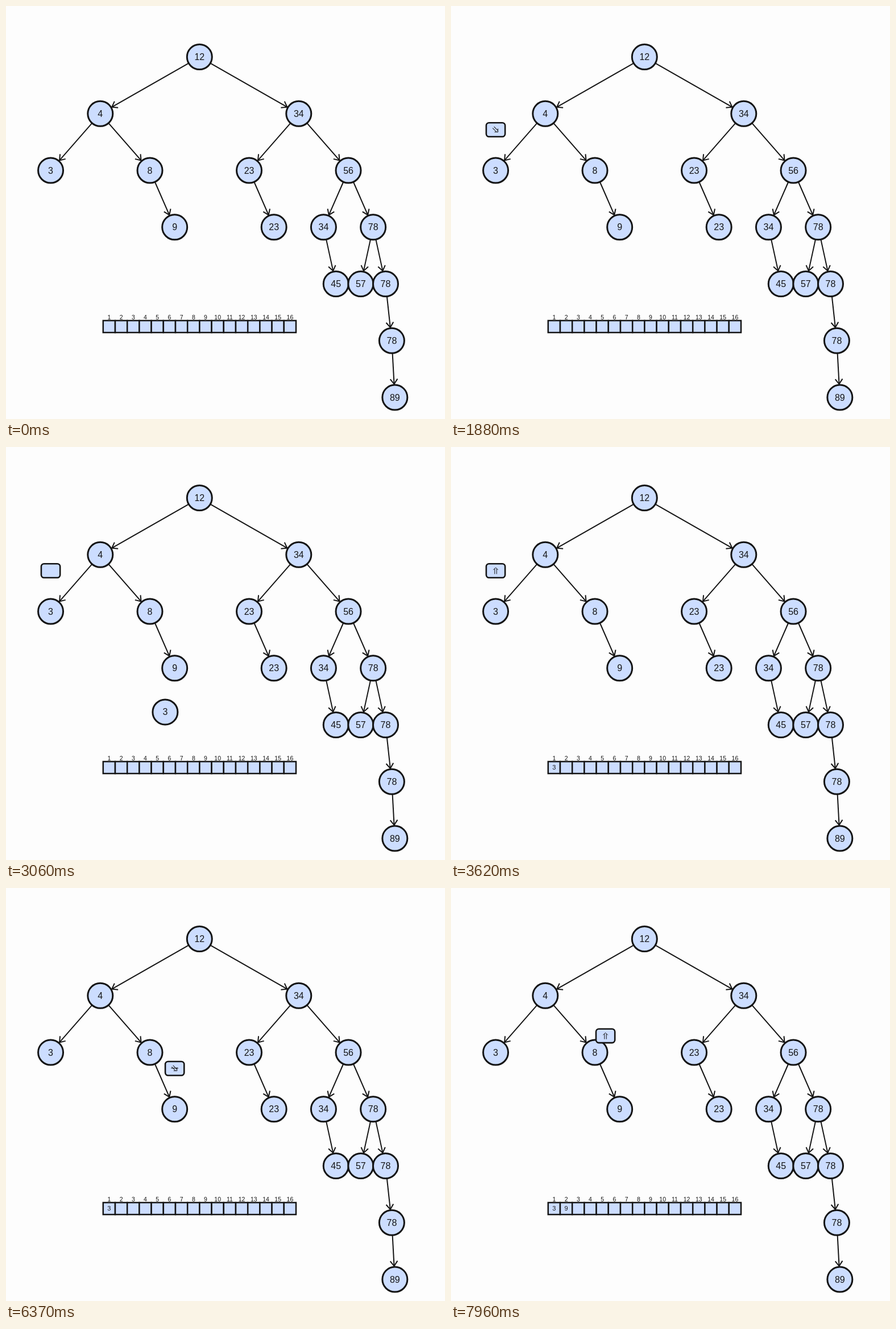
Write an HTML page with a canvas that moves like this. It is 772x726 px and loops after 7990 ms.

```html
<!DOCTYPE html>
<html lang="en">
<head>
<meta charset="utf-8">
<title>Tree traversal</title>
<style>
html, body { margin: 0; width: 772px; height: 726px; overflow: hidden; background: #fdfdfd; }
canvas { display: block; }
</style>
</head>
<body>
<canvas id="stage" width="772" height="726"></canvas>
<script>
const ctx = document.getElementById('stage').getContext('2d');
const LOOP = 7990, INK = '#141414', FILL = '#ccddff', FONT = '"Liberation Sans", Arial, sans-serif';
const ROOT = [340.3, 89.6], GAP = 99.75, SPREAD = 174.5, RADIUS = 22;

// Each node: the path from the root, then its value.
const nodes = Object.fromEntries(
  ':12 L:4 R:34 LL:3 LR:8 RL:23 RR:56 LRR:9 RLR:23 RRL:34 RRR:78 RRLR:45 RRRL:57 RRRR:78 RRRRR:78 RRRRRR:89'
    .split(' ').map(s => s.split(':')));

function place(path) {
  let [x, y] = ROOT;
  [...path].forEach((side, i) => {
    x += (side === 'L' ? -1 : 1) * SPREAD / 2 ** i;
    y += GAP;
  });
  return [x, y];
}

const badgeAt = path => {
  const [x, y] = place(path);
  return [x, y - 71.6];
};

// Stepped moves: start, time per step, number of steps, from, to.
const badgeMoves = [
  [650, 31, 8, '', 'L'],
  [1180, 26, 6, 'L', 'LL'],
  [3950, 26, 4, 'LL', 'L'],
  [4370, 46, 4, 'L', 'LR'],
  [5410, 30, 4, 'LR', 'LRR'],
  [7940, 20, 3.48, 'LRR', 'LR']
].map(([t, dt, n, a, b]) => [t, dt, n, badgeAt(a), badgeAt(b)]);

const DROP = [340.3, 519];
const copies = [
  { path: 'LL', show: 2540, move: [2860, 22, 13], hide: 3320 },
  { path: 'LRR', show: 6720, move: [7040, 22, 5], hide: 7320 }
];

// Arrow heading in degrees from up, with an optional strike.
const signs = [
  [330, 225], [1590, 225, true], [1880, 135], [2180, 135, true], [2490, null],
  [3620, 0], [4370, 225], [4790, 225, true], [5070, 135], [5410, 225],
  [5790, 225, true], [6080, 135], [6370, 135, true], [6670, null], [7610, 0]
];

function follow(t, [start, dt, n, from, to]) {
  const f = t < start ? 0 : Math.min(1, (Math.floor((t - start) / dt) + 1) / n);
  return from.map((v, i) => v + (to[i] - v) * f);
}

function line(width, ...points) {
  ctx.lineWidth = width;
  ctx.beginPath();
  points.forEach(([x, y], i) => i ? ctx.lineTo(x, y) : ctx.moveTo(x, y));
  ctx.stroke();
}

function label(text, x, baseline, size) {
  ctx.font = `${size}px ${FONT}`;
  ctx.fillStyle = INK;
  ctx.fillText(text, x, baseline);
}

function paint(width) {
  ctx.fillStyle = FILL;
  ctx.fill();
  ctx.lineWidth = width;
  ctx.stroke();
}

function drawNode([x, y], value) {
  ctx.beginPath();
  ctx.arc(x, y, RADIUS, 0, 2 * Math.PI);
  paint(3);
  label(value, x, y + 5.4, 16);
}

function drawEdge([x1, y1], [x2, y2]) {
  const a = Math.atan2(y2 - y1, x2 - x1);
  const away = (x, y, r, angle) => [x + r * Math.cos(angle), y + r * Math.sin(angle)];
  const tip = away(x2, y2, -RADIUS - 1.5, a);
  line(2, away(x1, y1, RADIUS, a), tip);
  line(2, away(...tip, -11, a - 0.62), tip, away(...tip, -11, a + 0.62));
}

function drawArray(t) {
  const cell = 21.2;
  for (let i = 0; i < 16; i++) {
    const x = 170.8 + i * cell, mid = x + cell / 2;
    ctx.beginPath();
    ctx.rect(x, 553, cell, 21);
    paint(2.5);
    label(i + 1, mid, 551.3, 10.5);
    const copy = copies[i];
    if (copy && t >= copy.hide) label(nodes[copy.path], mid, 567.3, 11);
  }
}

function drawBadge(t) {
  let pos = badgeAt('');
  for (const move of badgeMoves) if (t >= move[0]) pos = follow(t, move);
  ctx.save();
  ctx.translate(...pos);
  ctx.beginPath();
  ctx.roundRect(-16.6, -12.2, 33.2, 24.4, 5);
  paint(2.6);

  const [, heading, struck] = signs.findLast(s => t >= s[0]) || [0, null];
  if (heading !== null) {
    ctx.save();
    ctx.rotate(heading * Math.PI / 180);
    line(1, [-1.7, 5.8], [-1.7, -3.6]);
    line(1, [1.7, 5.8], [1.7, -3.6]);
    line(1, [-4.2, -1.4], [0, -5.6], [4.2, -1.4]);
    ctx.restore();
  }
  if (struck) line(1, [-6.4, -0.5], [6.4, -0.5]);
  ctx.restore();
}

function draw(t) {
  ctx.fillStyle = '#fdfdfd';
  ctx.fillRect(0, 0, 772, 726);
  ctx.strokeStyle = INK;
  ctx.textAlign = 'center';
  for (const path in nodes) if (path) drawEdge(place(path.slice(0, -1)), place(path));
  for (const path in nodes) drawNode(place(path), nodes[path]);
  drawArray(t);
  for (const { path, show, move, hide } of copies)
    if (t >= show && t < hide) drawNode(follow(t, [...move, place(path), DROP]), nodes[path]);
  if (t >= 20) drawBadge(t);
}

const begin = performance.now();
function tick() {
  draw((performance.now() - begin) % LOOP);
  requestAnimationFrame(tick);
}
tick();
</script>
</body>
</html>
```
